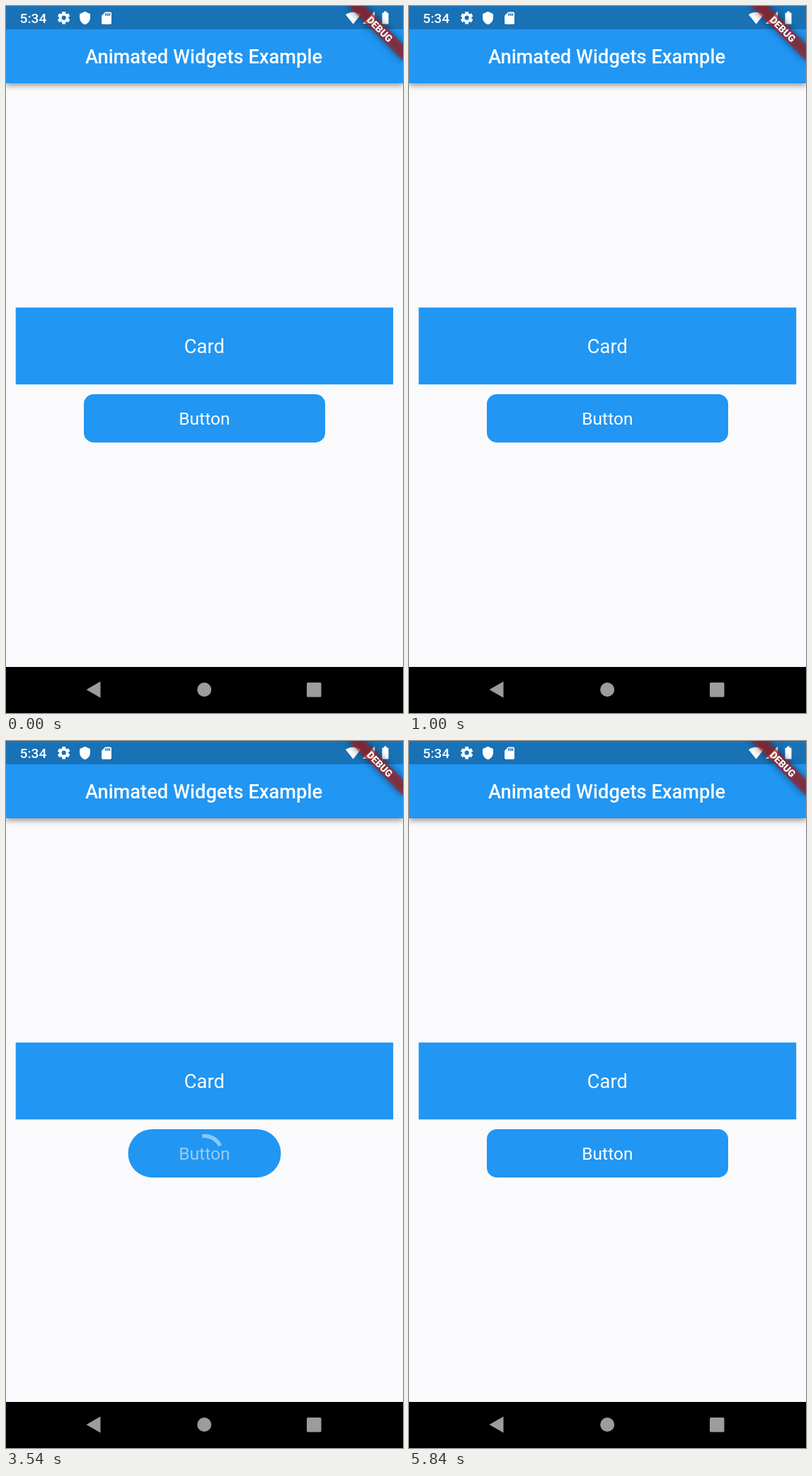
Recreate the animation shown at these times as an HTML page with a canvas. Size 561x998 px, loop 5890 ms.

```html
<!DOCTYPE html>
<html lang="en">
<head>
<meta charset="utf-8">
<title>Animated Widgets Example</title>
<style>
  html, body { margin: 0; width: 100%; height: 100%; overflow: hidden; background: #fafafa; }
  canvas { display: block; width: 561px; height: 998px; }
</style>
</head>
<body>
<canvas id="stage" width="561" height="998"></canvas>
<script>
const W = 561, H = 998, LOOP = 5890, DP = W / 411.2;
const BLUE = '#2196f3';
const ctx = document.getElementById('stage').getContext('2d');

const icons = {
  shield: 'M12 1L3 5v6c0 5.55 3.84 10.74 9 12 5.16-1.26 9-6.45 9-12V5z',
  sd: 'M18 2h-8L4 8v12c0 1.1.9 2 2 2h12c1.1 0 2-.9 2-2V4c0-1.1-.9-2-2-2zm-6 6h-2V4h2zm3 0h-2V4h2zm3 0h-2V4h2z',
  wifi: 'M12 21L24 6C23 5 19 2 12 2S1 5 0 6z',
  signal: 'M2 22h20V2z',
  battery: 'M16 4H14V2h-4v2H8Q7 4 7 5.3v15.4Q7 22 8.3 22h7.4Q17 22 17 20.7V5.3Q17 4 16 4z',
  trash: 'M6 19c0 1.1.9 2 2 2h8c1.1 0 2-.9 2-2V7H6zM19 4h-3.5l-1-1h-5l-1 1H5v2h14z',
  pencil: 'M3 17.25V21h3.75L17.8 9.94l-3.75-3.75zM20.7 7.04c.4-.4.4-1 0-1.4l-2.33-2.35c-.4-.4-1-.4-1.4 0l-1.84 1.83 3.75 3.75z'
};
for (const name in icons) icons[name] = new Path2D(icons[name]);

const mix = (a, b, p) => a + (b - a) * p;
const ramp = (t, start, length) => Math.min(1, Math.max(0, (t - start) / length));

// y of the cubic curve (0.4, 0, 0.2, 1) at x
function fastOutSlowIn(x) {
  let lo = 0, hi = 1;
  for (let i = 0; i < 20; i++) {
    const s = (lo + hi) / 2, r = 1 - s;
    if (1.2 * r * r * s + 0.6 * r * s * s + s * s * s < x) lo = s;
    else hi = s;
  }
  return 3 * lo * lo - 2 * lo * lo * lo;
}

function rect(x, y, w, h, color) {
  ctx.fillStyle = color;
  ctx.fillRect(x, y, w, h);
}

function disc(x, y, r, color) {
  ctx.fillStyle = color;
  ctx.beginPath();
  ctx.arc(x, y, r, 0, Math.PI * 2);
  ctx.fill();
}

function icon(name, x, y, scale, color = '#fff') {
  ctx.save();
  ctx.translate(x, y);
  ctx.scale(scale, scale);
  ctx.fillStyle = color;
  ctx.fill(icons[name]);
  ctx.restore();
}

function label(text, x, y, size, weight = 400, align = 'center') {
  ctx.font = `${weight} ${size}px Roboto, sans-serif`;
  ctx.textAlign = align;
  ctx.fillStyle = '#fff';
  ctx.fillText(text, x, y);
}

function gear(x, y) {
  ctx.save();
  ctx.translate(x, y);
  for (let i = 0; i < 6; i++) {
    rect(-2.4, -8.7, 4.8, 5, '#fff');
    ctx.rotate(Math.PI / 3);
  }
  ctx.strokeStyle = '#fff';
  ctx.lineWidth = 3.6;
  ctx.beginPath();
  ctx.arc(0, 0, 4.9, 0, Math.PI * 2);
  ctx.stroke();
  ctx.restore();
}

function topBar() {
  ctx.save();
  ctx.shadowColor = 'rgba(0,0,0,.42)';
  ctx.shadowBlur = 8;
  ctx.shadowOffsetY = 3;
  rect(0, 0, W, 109, BLUE);
  ctx.restore();
  rect(0, 0, W, 32.7, 'rgba(0,0,0,.25)');
  label('Animated Widgets Example', 279.5, 81, 20 * DP, 500);

  label('5:34', 19.5, 24, 19.2, 500, 'left');
  gear(81.7, 16.7);
  icon('shield', 101.6, 7, 0.83);
  icon('sd', 131.6, 6.7, 0.87);
  icon('wifi', 480, 7, 0.88);
  icon('signal', 502, 5.8, 0.87);
  icon('battery', 525.2, 5.8, 0.9);
}

function debugRibbon() {
  ctx.save();
  ctx.translate(W, 0);
  ctx.rotate(Math.PI / 4);
  const box = [-40 * DP, 28 * DP, 80 * DP, 12 * DP];
  ctx.filter = 'blur(5.4px)';
  rect(...box, 'rgba(0,0,0,.5)');
  ctx.filter = 'none';
  rect(...box, 'rgba(183,28,28,.627)');
  label('DEBUG', 0, 34 * DP + 5, 10.2 * DP, 900);
  ctx.restore();
}

function navBar() {
  rect(0, 933, W, 65, '#000');
  ctx.fillStyle = '#9c9c9c';
  ctx.beginPath();
  ctx.moveTo(113.5, 965);
  ctx.lineTo(133.5, 953.5);
  ctx.lineTo(133.5, 976.5);
  ctx.fill();
  disc(280.2, 965, 10, '#9c9c9c');
  ctx.beginPath();
  ctx.roundRect(425, 955, 20.5, 20.5, 1.5);
  ctx.fill();
}

function card(t) {
  const shift = 136 * (ramp(t, 1376, 500) - ramp(t, 2590, 500));
  if (shift > 0) {
    icon('trash', 16.4, 463.7, DP, '#f44336');
    icon('pencil', 81.9, 463.7, DP, '#4caf50');
  }
  rect(13.7 + shift, 425.6, 533.5, 108.6, BLUE);
  label('Card', 280.3 + shift, 490, 20 * DP);
}

function spinner(t, grow, alpha) {
  const cycles = 0.11 + (t - 4130) / 1570;
  const turn = Math.floor(cycles), u = cycles - turn;
  const head = fastOutSlowIn(Math.min(1, u * 2));
  const tail = fastOutSlowIn(Math.max(0, u * 2 - 1));
  const start = 160 + 0.315 * (t - 4130) + 270 * (turn + tail);
  const sweep = Math.max(1, 270 * (head - tail));
  const rad = Math.PI / 180;
  ctx.globalAlpha = alpha;
  ctx.strokeStyle = '#fff';
  ctx.lineWidth = 4 * DP;
  ctx.beginPath();
  // the outgoing ring stretches with its box and stays aligned to its top
  ctx.ellipse(280.5, 582 + 10 * grow, mix(24.5, 36, grow), 24.5, 0,
    start * rad, (start + sweep) * rad);
  ctx.stroke();
  ctx.globalAlpha = 1;
}

function button(t) {
  const grow = ramp(t, 4838, 300);
  const busy = ramp(t, 3400, 300) - grow;
  const w = mix(341, 75, busy);
  ctx.fillStyle = BLUE;
  ctx.beginPath();
  ctx.roundRect(280.5 - w / 2, 548, w, 68.2, Math.min(34.1, mix(14, 68, busy)));
  ctx.fill();
  ctx.save();
  ctx.clip();
  if (busy < 1) {
    ctx.globalAlpha = 1 - busy;
    label('Button', 280.4, 591, 18 * DP);
  }
  if (busy > 0) spinner(t, grow, busy);
  ctx.restore();
}

function draw(now) {
  const t = now % LOOP;
  rect(0, 0, W, H, '#fafafc');
  card(t);
  button(t);
  topBar();
  navBar();
  debugRibbon();
  requestAnimationFrame(draw);
}
draw(performance.now());
</script>
</body>
</html>
```
